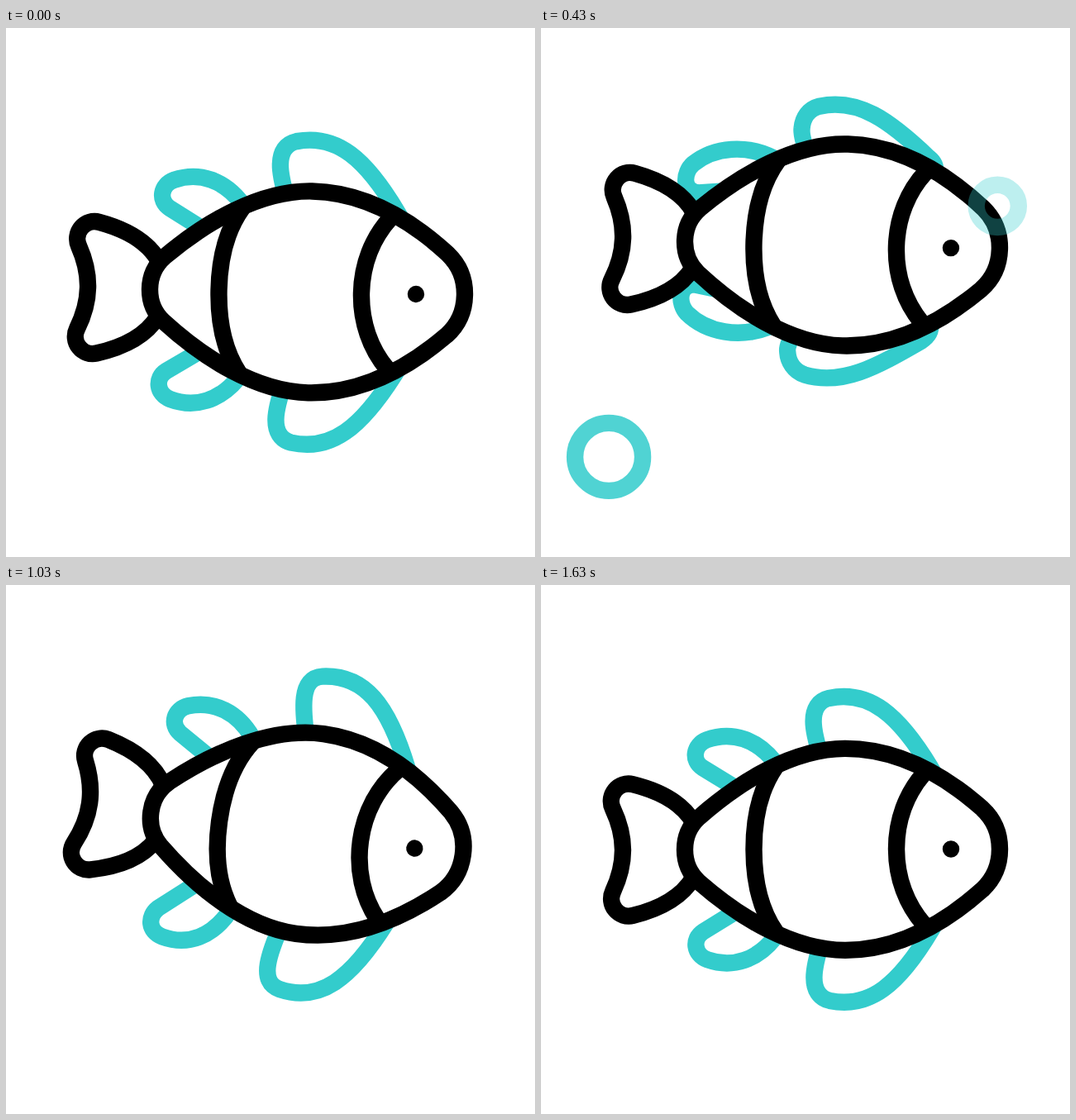
Recreate the animation shown at these times as an HTML page. Size 640x640 px, loop 1670 ms.

```html
<!DOCTYPE html>
<html lang="en">
<head>
<meta charset="utf-8">
<title>Swimming fish</title>
<style>
  html, body { margin: 0; width: 100%; height: 100%; overflow: hidden; background: #fff; }
  svg { display: block; width: 100%; height: 100%; stroke-width: 20.4; }
  .teal { fill: none; stroke: #3cc; }
  .ink { fill: none; stroke: #000; stroke-linejoin: round; }
</style>
</head>
<body>
<svg viewBox="0 0 640 640">
  <g id="fish">
    <g class="teal">
      <path id="dorsal"/>
      <path id="rearTop"/>
      <g transform="matrix(1 0 0 -1 0 640)">
        <path id="anal"/>
        <path id="rearBottom"/>
      </g>
    </g>
    <g class="ink">
      <path d="M184 286C169 261 139 247.5 111 240.6A21 21 0 0 0 87 270C94.5 286 99 302 99 320S94.5 354 87 370A21 21 0 0 0 111 399.4C139 392.5 169 379 184 354"/>
      <path fill="#fff" d="M191 281C240 238 305 198 368 198C435 198 490 232 534 271C548 284 555 301 555 320S548 356 534 369C490 408 435 442 368 442C305 442 240 402 191 359C180 349 174 335 174 320S180 291 191 281Z"/>
      <path d="M284 220C266 246 257.5 282 257.5 320S266 394 284 420M463 229C442 253 430 285 430 320S442 387 463 411"/>
    </g>
    <circle cx="496" cy="320" r="10.2"/>
  </g>
  <circle class="teal" id="bigBubble" r="41"/>
  <circle class="teal" id="smallBubble" r="25.6"/>
</svg>
<script>
const LOOP = 1670, STEPS = 50;
const el = id => document.getElementById(id);

// Sine-eased swing between turning points [step, value].
const swing = (...points) => n => {
  const i = points.findIndex(p => p[0] > n);
  if (i < 1) return points.at(i)[1];
  const [t0, v0] = points[i - 1], [t1, v1] = points[i];
  return v0 + (v1 - v0) * (1 - Math.cos(Math.PI * (n - t0) / (t1 - t0))) / 2;
};

// Blends two paths of the same structure: k = 0 open, k = 1 folded.
function morph(open, folded) {
  const target = folded.match(/\d+/g);
  return k => {
    let i = 0;
    return open.replace(/\d+/g, v => (+v + (target[i++] - v) * k).toFixed(2));
  };
}

const longFin = morph(
  'M339 208C334 192 330 177 330 165C330 150 336 140 349 137C398 127 433 157 472 222C474 225 475 227 476 230',
  'M312 212C307 200 304 192 305 186C306 174 313 163 326 159C372 147 411 171 464 208C474 215 475 221 474 228');
const shortFin = morph(
  'M240 248L196 221C182 212 185 193 201 187C232 176 262 187 283 214',
  'M230 258L189 261C169 260 170 237 182 226C207 205 246 201 280 218');

const lift = swing([-1, 0], [9, -64], [11, -64], [22, 0], [34, -30], [44, 0]);
const tilt = swing([-1, 0], [5, 17.4], [17.5, -4.7], [29, 9], [40, -5], [49, 0]);
const foldDorsal = swing([-1, 0], [6, 1], [11, 1], [18, -.4], [31, -.35], [42, 0]);
const foldRear = swing([-1, 0], [10, 1.05], [12, 1.05], [23, 0]);
const foldBelow = swing([-1, 0], [12, 1.15], [23, -.38], [31, -.38], [41, 0]);

// Each bubble rises steadily for a fixed life, fading in and out.
function bubble(id, n, born, y, sway) {
  const u = Math.min(1, Math.max(0, (n - born) / 9));
  el(id).setAttribute('transform', `translate(${sway(u * Math.PI / 2)} ${y - 124 * u})`);
  el(id).setAttribute('opacity', Math.min(1, 1.92 * u, 2.6 * (1 - u)));
}

function draw(now) {
  const n = Math.floor((now % LOOP + 5) / LOOP * STEPS) % STEPS;
  el('fish').setAttribute('transform', `translate(0 ${lift(n)}) rotate(${tilt(n)} 320 320)`);
  el('dorsal').setAttribute('d', longFin(foldDorsal(n)));
  el('rearTop').setAttribute('d', shortFin(foldRear(n)));
  el('anal').setAttribute('d', longFin(foldBelow(n)));
  el('rearBottom').setAttribute('d', shortFin(foldBelow(n - 1.5)));
  bubble('bigBubble', n, 9, 574, a => 102 - 26 * Math.cos(a));
  bubble('smallBubble', n, 11.5, 236, a => 545 + 28 * Math.sin(a));
}

const start = performance.now();
function tick() {
  draw(performance.now() - start);
  requestAnimationFrame(tick);
}
tick();
</script>
</body>
</html>
```
